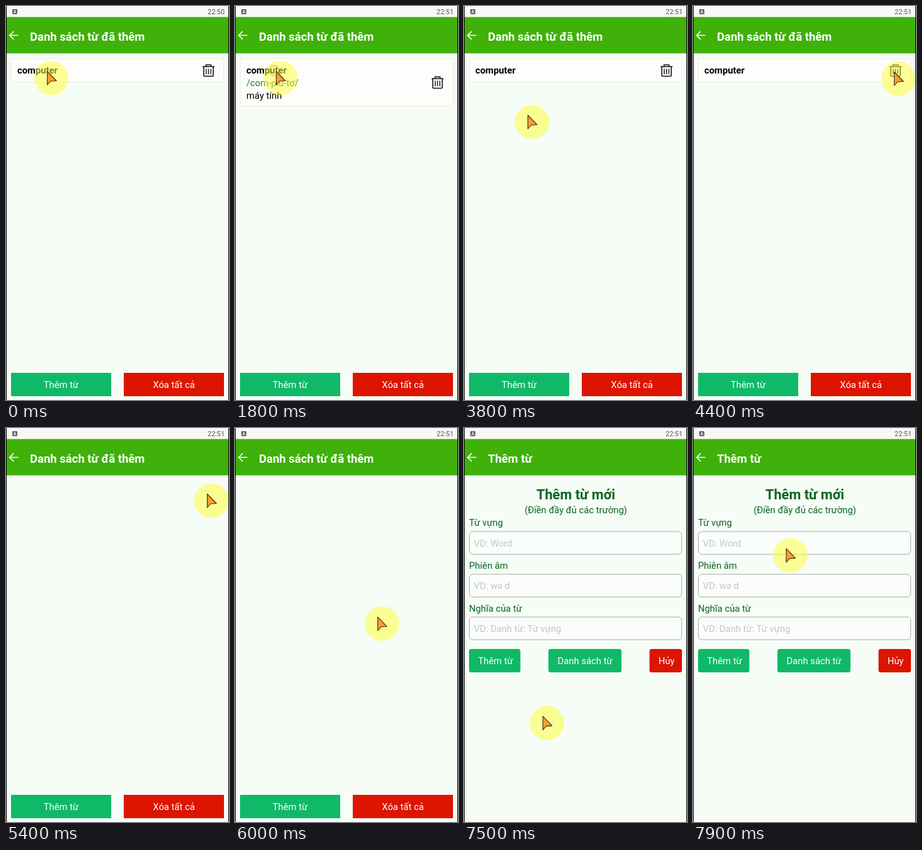
An HTML page for the animation above (8 s loop, 354 by 624 pixels).

```html
<!DOCTYPE html>
<html lang="vi">
<head>
<meta charset="utf-8">
<title>Danh sách từ</title>
<style>
  html, body { margin: 0; width: 100%; height: 100%; overflow: hidden; background: #f6fcf6; }
  svg { display: block; width: 354px; height: 624px; font: 14.8px Roboto, "Noto Sans", sans-serif; }
  .bold { font-weight: 700; }
  .title { font-size: 18.5px; font-weight: 700; fill: #fff; }
  .light { fill: #fff; }
  .label { fill: #0a6420; }
  .hint { fill: #c3c8c5; }
  .mid { text-anchor: middle; }
  .field { fill: #fafdfa; stroke: #a3ada8; }
  .go { fill: #0fb968; }
  .no { fill: #dc1400; }
</style>
</head>
<body>
<svg viewBox="0 0 354 624">
  <rect width="354" height="624" fill="#f6fcf6"/>
  <rect width="354" height="18" fill="#f8f8f8"/>
  <rect y="17.5" width="354" height="57.5" fill="#3fb10a"/>
  <rect x="10" y="5" width="8" height="8" rx="1" fill="#606060"/>
  <path d="M12 11.5L14 6.5L16 11.5M12.8 10H15.2" fill="none" stroke="#fff" stroke-width=".9"/>
  <text id="clock" x="347" y="13" text-anchor="end" font-size="10.8" fill="#555"></text>
  <path d="M19.5 46.5H6M12.3 40L5.8 46.5L12.3 53" fill="none" stroke="#fff" stroke-width="1.7"/>

  <g id="list">
    <text class="title" x="38" y="55">Danh sách từ đã thêm</text>
    <g id="card">
      <rect id="box" x="8.5" y="83.5" width="337" fill="#fdfefc" stroke="#e6ece2"/>
      <text class="bold" x="18" y="106.5">computer</text>
      <g id="more">
        <text x="18" y="126.5" fill="#2a7a40">/com-piu-tơ/</text>
        <text x="18" y="146.5">máy tính</text>
      </g>
      <g id="bin" fill="none" stroke="#111" stroke-width="1.6">
        <path d="M312 -6H331M317.5 -6V-8.8H325.5V-6M314 -6V7.5Q314 9.2 315.7 9.2H327.3Q329 9.2 329 7.5V-6"/>
        <path d="M317.8 -2.5V6M321.5 -2.5V6M325.2 -2.5V6" stroke-width="1.4"/>
      </g>
    </g>
    <rect class="go" x="8" y="581" width="159" height="37"/>
    <rect class="no" x="187" y="581" width="159" height="37"/>
    <text class="light mid" x="87.5" y="605">Thêm từ</text>
    <text class="light mid" x="266.5" y="605">Xóa tất cả</text>
  </g>

  <g id="form">
    <rect y="75" width="354" height="549" fill="#f6fcf6"/>
    <rect x="30" y="20" width="300" height="53" fill="#3fb10a"/>
    <text class="title" x="38" y="55">Thêm từ</text>
    <text class="label mid bold" x="177.5" y="112.5" font-size="21.8">Thêm từ mới</text>
    <text class="label mid" x="177.5" y="135">(Điền đầy đủ các trường)</text>
    <text class="label" x="8" y="155">Từ vựng</text>
    <text class="label" x="8" y="223">Phiên âm</text>
    <text class="label" x="8" y="290.5">Nghĩa của từ</text>
    <rect class="field" x="8.5" y="164" width="337" height="36" rx="5.5"/>
    <rect class="field" x="8.5" y="231.7" width="337" height="36" rx="5.5"/>
    <rect class="field" x="8.5" y="299.3" width="337" height="36" rx="5.5"/>
    <text class="hint" x="15.5" y="187.5">VD: Word</text>
    <text class="hint" x="15.5" y="255.2">VD: wə d</text>
    <text class="hint" x="15.5" y="323">VD: Danh từ: Từ vựng</text>
    <rect class="go" x="8" y="350" width="81.5" height="37" rx="3.5"/>
    <rect class="go" x="134" y="350" width="116" height="37" rx="3.5"/>
    <rect class="no" x="294.5" y="350" width="51.5" height="37" rx="3.5"/>
    <text class="light mid" x="50" y="374">Thêm từ</text>
    <text class="light mid" x="192" y="374">Danh sách từ</text>
    <text class="light mid" x="321.5" y="374">Hủy</text>
  </g>

  <path d="M.5 0V624M353.5 0V624" stroke="#000"/>
  <g id="cursor">
    <circle r="27.3" fill="#ffff3c" fill-opacity=".53"/>
    <circle id="ring" cx="-9.5" cy="-11.5" fill="none" stroke="#b8481c" stroke-width="2"/>
    <path d="M-6.5 -10.5V11L-1.2 5L8 4.5Z" fill="#ff9f30" stroke="#3d2a18" stroke-width="1.1" stroke-linejoin="round"/>
  </g>
</svg>
<script>
const LOOP = 8000, STEP = 100;
const $ = id => document.getElementById(id);
const clamp = v => Math.max(0, Math.min(1, v));
const show = (id, on) => $(id).style.display = on ? '' : 'none';
const set = (id, attrs) => { for (const k in attrs) $(id).setAttribute(k, attrs[k]); };

// start, end, then the four control points of the cubic path
const moves = [
  [3500, 4400, [72, 114], [95, 260], [217, 162], [326, 115]],
  [5600, 6500, [326, 115], [270, 250], [150, 450], [111, 604.5]],
  [7190, 8000, [111, 604.5], [138, 465], [144, 324], [156, 184]]
];
const clicks = [1400, 2300, 4600, 6500];

function cursorAt(t) {
  const [a, b, ...p] = moves.findLast(m => t >= m[0]) || moves[0];
  const u = clamp((t - a) / (b - a)), s = u * u * (3 - 2 * u), r = 1 - s;
  const w = [r * r * r, 3 * r * r * s, 3 * r * s * s, s * s * s];
  return [0, 1].map(i => w.reduce((sum, k, j) => sum + k * p[j][i], 0));
}

function draw(t) {
  const open = t >= 1600 && t < 2600;
  set('box', { height: open ? 75 : 37 });
  set('bin', { transform: `translate(0 ${open ? 121 : 102})` });
  show('more', open);
  show('card', t < 4900);
  $('clock').textContent = t < 1000 ? '22:50' : '22:51';

  const page = clamp((t - 6800) / 200);
  show('form', page > 0);
  set('form', { opacity: page });

  const age = (t - (clicks.findLast(c => t >= c) ?? -LOOP)) / 600;
  set('ring', { r: 5 + 3 * Math.min(1, age * 2), opacity: 0.8 * clamp(1 - age) });
  set('cursor', { transform: `translate(${cursorAt(t)})` });
}

function tick() {
  draw(Math.floor(performance.now() % LOOP / STEP) * STEP);
  requestAnimationFrame(tick);
}
tick();
</script>
</body>
</html>
```
